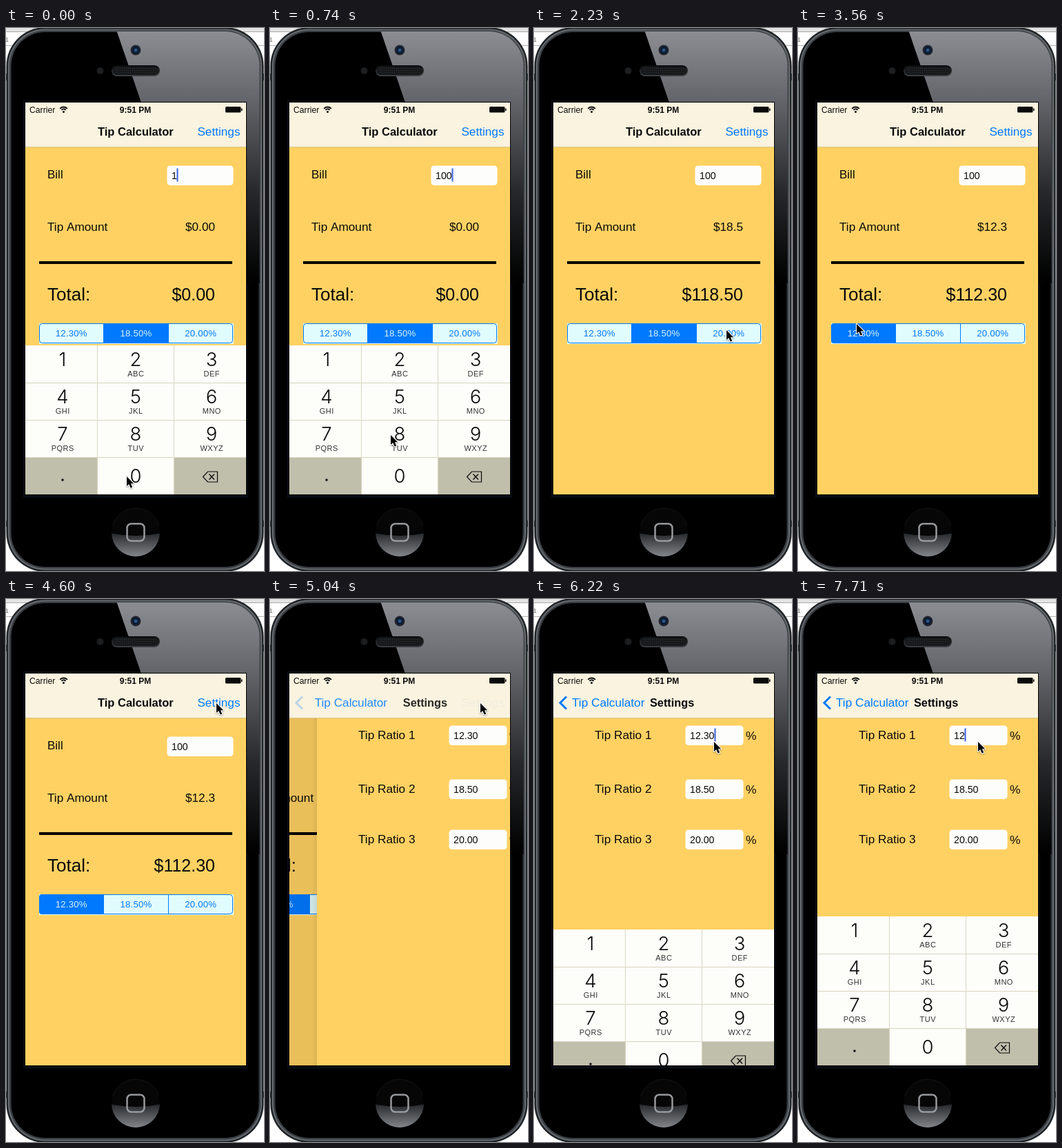
An HTML page with a canvas for the animation above (8000 ms loop, 374x787 px).

```html
<!DOCTYPE html>
<html lang="en">
<head>
<meta charset="utf-8">
<title>Tip Calculator</title>
<style>
  html, body { margin: 0; width: 100%; height: 100%; overflow: hidden; background: #fff; }
  canvas { display: block; }
</style>
</head>
<body>
<canvas id="stage" width="374" height="787"></canvas>
<script>
const ctx = document.getElementById('stage').getContext('2d');
const LOOP = 8000;
const SCREEN = { x: 28, y: 108, w: 320, h: 568 };
const BLUE = '#0079ff', YELLOW = '#ffd162', CREAM = '#faf3df', INK = '#0a0a0a';
const KEY = '#fdfdfa', KEY_GREY = '#c0bfac', RULE = '#d8d6bf';
const SANS = '"Liberation Sans", sans-serif';
const LIGHT = 'Inter, "Liberation Sans", sans-serif';
const KEYPAD_HIDE = 1371, PUSH_START = 4842, KEYPAD_SHOW = 5998;

const SHORT_TICKS = [1, 13, 20, 24, 28, 32, 37, 42, 46];
const LAST_TICK = 52;
const tickTime = n => 150 * n - 10 * SHORT_TICKS.filter(s => s <= n).length;
function tickAt(t) {
  let n = 0;
  while (n < LAST_TICK && tickTime(n + 1) <= t) n++;
  return n;
}

// Critically damped spring, falling from 1 to 0.
function spring(ms) {
  if (ms <= 0) return 1;
  const u = 18.26 * ms / 1000;
  return (1 + u) * Math.exp(-u);
}

// tick, x, y of the pointer tip
const POINTER = [
  [0, 175, 650], [4, 175, 650], [5, 175, 590], [6, 175, 430], [7, 175, 316], [8, 175, 302],
  [11, 175, 302], [12, 181, 307], [13, 207, 338], [14, 255, 411], [15, 279, 438], [16, 282, 441],
  [18, 282, 441], [19, 265, 442], [20, 200, 444], [21, 125, 443], [22, 88, 441], [23, 88, 441],
  [24, 85, 429], [25, 140, 270], [26, 225, 205], [27, 280, 170], [28, 300, 158], [31, 305, 151],
  [35, 305, 151], [36, 303, 158], [37, 290, 180], [38, 268, 202], [39, 261, 207]
];
function pointerAt(n) {
  const i = POINTER.findIndex(k => k[0] >= n);
  if (i < 0) return POINTER[POINTER.length - 1].slice(1);
  if (i === 0) return POINTER[0].slice(1);
  const [a, ax, ay] = POINTER[i - 1], [b, bx, by] = POINTER[i];
  const f = (n - a) / (b - a);
  return [Math.round(ax + (bx - ax) * f), Math.round(ay + (by - ay) * f)];
}

function text(s, x, y, size, color = INK, { align = 'left', weight = 400, family = SANS, spacing = 0 } = {}) {
  ctx.font = `${weight} ${size}px ${family}`;
  ctx.textAlign = align;
  ctx.letterSpacing = spacing + 'px';
  ctx.fillStyle = color;
  ctx.fillText(s, x, y);
}
function rect(x, y, w, h, color) {
  ctx.fillStyle = color;
  ctx.fillRect(x, y, w, h);
}
function roundPath(x, y, w, h, r) {
  ctx.beginPath();
  ctx.roundRect(x, y, w, h, r);
}
function fillRound(x, y, w, h, r, color) {
  roundPath(x, y, w, h, r);
  ctx.fillStyle = color;
  ctx.fill();
}
function disc(x, y, r, color) {
  ctx.beginPath();
  ctx.arc(x, y, r, 0, 7);
  ctx.fillStyle = color;
  ctx.fill();
}
function polyline(points) {
  ctx.beginPath();
  points.forEach(([x, y]) => ctx.lineTo(x, y));
}
function stroke(color, width) {
  ctx.strokeStyle = color;
  ctx.lineWidth = width;
  ctx.stroke();
}
function verticalFade(y0, y1, ...stops) {
  const g = ctx.createLinearGradient(0, y0, 0, y1);
  stops.forEach(([at, color]) => g.addColorStop(at, color));
  return g;
}
function withAlpha(alpha, draw) {
  ctx.save();
  ctx.globalAlpha *= Math.max(0, Math.min(1, alpha));
  draw();
  ctx.restore();
}

function bodyPath(inset) {
  roundPath(0.5 + inset, inset - 1, 373 - 2 * inset, 789 - 2 * inset, 56 - inset);
}

function drawPhone() {
  rect(0, 0, 374, 787, '#fff');
  rect(0, 0, 374, 6, '#e4e4e4');
  rect(0, 5, 374, 1, '#a8a8a8');
  rect(0, 25, 374, 1, '#b5b5b5');
  text('1', -1, 20, 9, '#666');

  [0, 371].forEach(x => {
    rect(x, 66, 3, 10, '#5a5e62');
    rect(x, 714, 3, 9, '#5a5e62');
  });
  [[0, '#202326'], [2.5, '#666b70'], [4.5, '#3b3f43'], [7, '#000']].forEach(([inset, color]) => {
    bodyPath(inset);
    ctx.fillStyle = color;
    ctx.fill();
  });

  rect(25, 105, 326, 576, '#080b13');
  ctx.save();
  bodyPath(6);
  ctx.clip();
  polyline([[159, 0], [196, 108], [348, 108], [348, 370], [374, 370], [374, 0]]);
  ctx.fillStyle = verticalFade(0, 370, [0, '#8d8f95'], [0.29, '#626469'], [0.65, '#25272a'], [1, '#000']);
  ctx.fill();
  ctx.restore();
  rect(27, 107, 322, 570, '#000');

  fillRound(153, 54, 70, 16, 8, verticalFade(54, 70, [0, '#08090a'], [1, '#3f4145']));
  fillRound(155, 56, 66, 12, 6, '#17181a');
  for (let y = 58; y < 67; y += 3)
    for (let x = 159; x < 218; x += 3) rect(x, y, 1, 1, '#34363a');
  disc(136.5, 62, 5, '#1d1e20');
  disc(188, 32, 7.5, '#24282e');
  disc(188, 32, 5.5, '#0d1a2f');
  disc(188, 32, 2.5, '#28548c');

  ctx.save();
  disc(188, 731, 35, '#060606');
  ctx.clip();
  ctx.beginPath();
  ctx.moveTo(150, 732);
  ctx.quadraticCurveTo(188, 740, 226, 732);
  ctx.lineTo(226, 770);
  ctx.lineTo(150, 770);
  ctx.fillStyle = verticalFade(732, 767, [0, '#25272a'], [1, '#85888c']);
  ctx.fill();
  ctx.restore();
  ctx.beginPath();
  ctx.arc(188, 731, 35, Math.PI * 1.1, Math.PI * 1.9);
  stroke('#151515', 1);
  roundPath(175.5, 718.5, 25, 25, 6);
  stroke('#97999c', 2.5);
}

function drawField(x, y, w, value, caretAlpha = 0) {
  fillRound(x, y, w, 28.5, 4.5, '#fdfdfb');
  text(value, x + 6.5, y + 19, 14.2);
  const caretX = Math.round(x + 6.5 + ctx.measureText(value).width);
  if (caretAlpha) withAlpha(caretAlpha, () => rect(caretX - 0.5, y + 4, 2, 19, '#3a5fe0'));
}

function drawSegments(selected, pressed) {
  const labels = ['12.30%', '18.50%', '20.00%'];
  const edges = [48, 141.5, 235.5, 329];
  rect(48, 428, 282, 30, '#e1fcfc');
  ctx.save();
  roundPath(48, 428, 281, 29, 4);
  ctx.clip();
  labels.forEach((label, i) => {
    const on = i === selected, w = edges[i + 1] - edges[i];
    if (on) rect(edges[i], 428, w, 29, BLUE);
    if (i === pressed) rect(edges[i], 428, w, 29, 'rgba(0,121,255,.15)');
    if (i) rect(edges[i] - 0.5, 428, 1, 29, BLUE);
    text(label, edges[i] + w / 2, 446.5, 13.2, on ? '#d8f2ff' : BLUE, { align: 'center', spacing: 0.2 });
  });
  ctx.restore();
  roundPath(48.5, 428.5, 280, 28, 4);
  stroke(BLUE, 1);
}

function drawBillView(n) {
  const rates = [12.3, 18.5, 20];
  const selected = n < 18 ? 1 : n < 23 ? 2 : 0;
  const bill = n < 2 ? '1' : n < 4 ? '10' : '100';
  const rate = rates[selected], dismissed = n >= 10;
  rect(28, 172, 320, 504, YELLOW);
  text('Bill', 60, 218, 17);
  drawField(233.5, 199.5, 96, bill, dismissed ? 0 : 1);
  text('Tip Amount', 60, 294, 17.2);
  text('$' + (dismissed ? rate.toFixed(1) : '0.00'), 303, 294, 17.2, INK, { align: 'right' });
  rect(48, 338, 280, 4, '#000');
  text('Total:', 60, 395, 26);
  text('$' + (dismissed ? (100 + rate).toFixed(2) : '0.00'), 303, 394.5, 25, INK, { align: 'right' });
  drawSegments(selected, n === 17 ? 2 : -1);
}

function drawSettingsView(n) {
  const first = n < 49 ? '12.30' : n < 51 ? '12.3' : n < 52 ? '12.' : '12';
  const blink = { 45: 0.5, 46: 0, 47: 0, 48: 0.5 };
  const caret = n < 41 ? 0 : n in blink ? blink[n] : 1;
  rect(28, 172, 320, 504, YELLOW);
  [[183.5, first, caret], [261.5, '18.50', 0], [334.5, '20.00', 0]].forEach(([y, value, alpha], i) => {
    text('Tip Ratio ' + (i + 1), 88, y + 19, 17.2);
    drawField(219.5, y, 84, value, alpha);
    text('%', 307, y + 20, 17.4);
  });
}

function drawNavBar(n, rest) {
  rect(28, 108, 320, 64, CREAM);
  rect(28, 172, 320, 1, '#d9c68e');
  text('Carrier', 34, 122.5, 12.2);
  disc(83.5, 121.5, 1.5, INK);
  [4, 7].forEach(r => {
    ctx.beginPath();
    ctx.arc(83.5, 121.5, r, -Math.PI * 0.77, -Math.PI * 0.23);
    stroke(INK, 1.9);
  });
  text('9:51 PM', 187.5, 122.5, 12, INK, { align: 'center', weight: 700 });
  fillRound(318, 114, 22.5, 8.5, 1.5, INK);
  rect(341, 116.5, 1.5, 3.5, INK);

  const titleX = 55 + 78 * rest, pushed = 1 - rest;
  withAlpha(1 - 2 * pushed, () => text('Tip Calculator', titleX, 156, 16.5, INK, { weight: 700 }));
  const pressed = n === 32 ? 0.3 : 1;
  withAlpha(Math.pow(rest, 1.5) * pressed, () => text('Settings', 339.5, 156, 17.2, BLUE, { align: 'right' }));
  if (!pushed) return;
  withAlpha(pushed, () => {
    text('Tip Calculator', titleX, 156, 17.2, BLUE);
    text('Settings', 168 + 200 * rest, 156, 16.3, INK, { weight: 700 });
  });
  withAlpha(1 - 6 * rest, () => {
    polyline([[47, 141.5], [38, 150.5], [47, 159.5]]);
    stroke(BLUE, 3);
  });
}

function drawKeypad(offset, zeroDown) {
  const letters = ['', 'ABC', 'DEF', 'GHI', 'JKL', 'MNO', 'PQRS', 'TUV', 'WXYZ'];
  const centers = [82, 188, 298];
  const digit = (s, x, y) => text(s, x, y, 27.5, INK, { align: 'center', weight: 300, family: LIGHT });
  ctx.save();
  ctx.translate(0, 460 + offset);
  rect(28, 0, 320, 216, KEY);
  rect(28, 162, 105, 54, KEY_GREY);
  rect(243, 162, 105, 54, KEY_GREY);
  if (zeroDown) rect(133, 162, 110, 54, KEY_GREY);
  [54, 108, 162].forEach(y => rect(28, y, 320, 1, RULE));
  [132, 243].forEach(x => rect(x, 0, 1, 216, RULE));
  letters.forEach((s, i) => {
    const x = centers[i % 3], y = 54 * Math.floor(i / 3);
    digit(i + 1, x, y + 30);
    text(s, x + 0.3, y + 45, 11, '#333', { align: 'center', spacing: 0.5 });
  });
  digit('0', 188, 199);
  rect(80.5, 193.5, 3, 3, INK);
  polyline([[285.5, 190.5], [292.5, 183], [306.5, 183], [306.5, 198], [292.5, 198]]);
  ctx.closePath();
  stroke(INK, 1.2);
  polyline([[294.5, 186.5], [302, 194.5]]);
  stroke(INK, 1.3);
  polyline([[302, 186.5], [294.5, 194.5]]);
  stroke(INK, 1.3);
  ctx.restore();
}

function drawPointer(x, y) {
  ctx.save();
  ctx.translate(x, y);
  polyline([[0, 0], [0, 14], [3.2, 11], [5.6, 16.5], [8.2, 15.4], [5.9, 10.2], [10.2, 10.2]]);
  ctx.closePath();
  ctx.lineJoin = 'round';
  ctx.shadowColor = 'rgba(0,0,0,.35)';
  ctx.shadowBlur = 2;
  ctx.shadowOffsetY = 1;
  stroke('#fff', 2.2);
  ctx.shadowColor = 'transparent';
  ctx.fillStyle = '#000';
  ctx.fill();
  ctx.restore();
}

function drawScreen(n) {
  const now = tickTime(n);
  const rest = spring(now - PUSH_START);
  const pushed = 1 - rest;
  ctx.save();
  ctx.beginPath();
  ctx.rect(SCREEN.x, SCREEN.y, SCREEN.w, SCREEN.h);
  ctx.clip();

  ctx.save();
  ctx.translate(-96 * pushed, 0);
  drawBillView(n);
  ctx.restore();
  if (pushed) {
    rect(28, 172, 320, 504, `rgba(0,0,0,${0.1 * pushed})`);
    ctx.save();
    ctx.translate(Math.round(320 * rest), 0);
    const shade = ctx.createLinearGradient(20, 0, 28, 0);
    shade.addColorStop(0, 'rgba(0,0,0,0)');
    shade.addColorStop(1, 'rgba(0,0,0,.06)');
    rect(20, 172, 8, 504, shade);
    drawSettingsView(n);
    ctx.restore();
  }
  drawNavBar(n, rest);

  const hidden = now < KEYPAD_SHOW ? 1 - spring(now - KEYPAD_HIDE) : spring(now - KEYPAD_SHOW);
  const offset = Math.round(216 * hidden);
  if (offset < 216) drawKeypad(offset, n === 1 || n === 3);
  ctx.restore();
}

const start = performance.now();
function run() {
  const n = tickAt((performance.now() - start) % LOOP);
  drawPhone();
  drawScreen(n);
  drawPointer(...pointerAt(n));
  requestAnimationFrame(run);
}
run();
</script>
</body>
</html>
```
